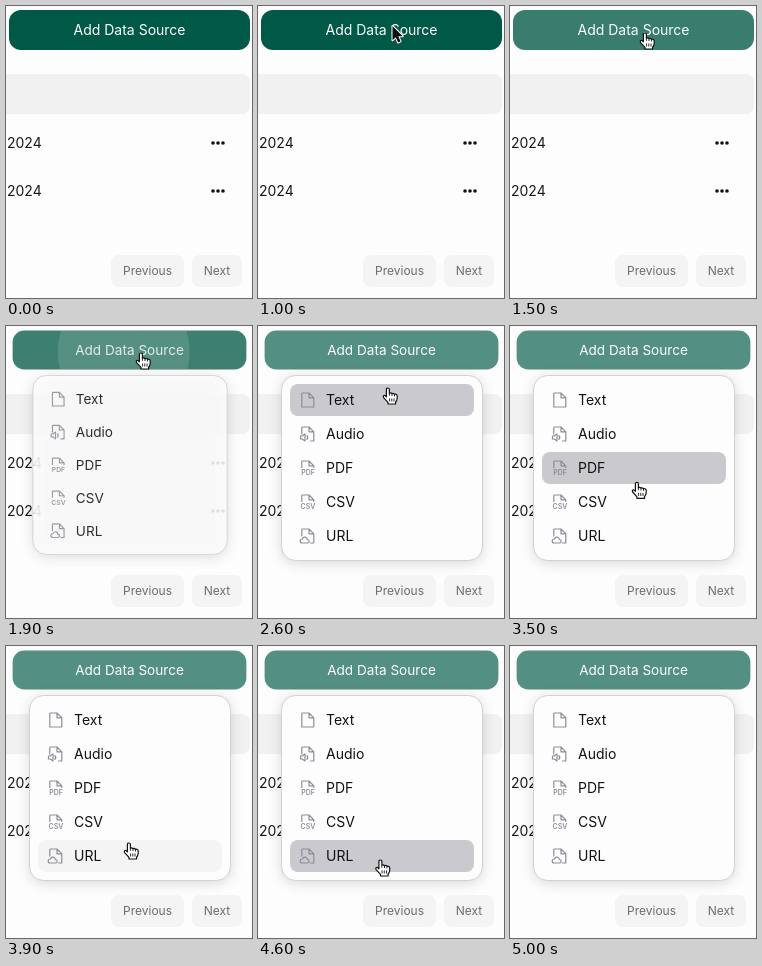
Write an HTML page with a canvas that moves like this. It is 246 by 292 pixels and loops after 5200 ms.

```html
<!DOCTYPE html>
<html lang="en">
<head>
<meta charset="utf-8">
<title>Add Data Source</title>
<style>
html, body { margin: 0; width: 100%; height: 100%; overflow: hidden; background: #fdfdfd; }
canvas { display: block; width: 246px; height: 292px; }
</style>
</head>
<body>
<canvas id="stage"></canvas>
<script>
const W = 246, H = 292, LOOP = 5200, STEP = 100;
const FONT = 'Inter, "Liberation Sans", sans-serif';
const canvas = document.getElementById('stage');
const ctx = canvas.getContext('2d');
const dpr = window.devicePixelRatio || 1;
canvas.width = W * dpr;
canvas.height = H * dpr;

const ITEMS = ['Text', 'Audio', 'PDF', 'CSV', 'URL'];
const ROW_TOP = 58, ROW_H = 32, PITCH = 34;

// Cursor tip: time, x, y
const PATH = [
  [700, 138, -6], [800, 137, 4], [900, 135.5, 13], [1000, 134.5, 20], [1200, 135, 27],
  [1900, 135, 27], [2200, 134, 42], [2400, 132, 59], [2600, 130, 62], [3200, 130, 126],
  [3900, 123, 197], [4100, 122, 206], [4500, 122, 206], [4700, 123, 222], [4900, 125, 262]
];

// Piecewise linear value of column c at time t
function track(keys, t, c = 1) {
  if (t <= keys[0][0]) return keys[0][c];
  for (let i = 1; i < keys.length; i++) {
    const a = keys[i - 1], b = keys[i];
    if (t <= b[0]) return a[c] + (b[c] - a[c]) * (t - a[0]) / (b[0] - a[0]);
  }
  return keys[keys.length - 1][c];
}

function tipAt(t) {
  return t < 700 || t >= 5000 ? null : { x: track(PATH, t, 1), y: track(PATH, t, 2) };
}

function box(x, y, w, h, r, fill) {
  ctx.beginPath();
  ctx.roundRect(x, y, w, h, r);
  ctx.fillStyle = fill;
  ctx.fill();
}

function text(str, x, y, size, color, weight = 400, align = 'left') {
  ctx.font = `${weight} ${size}px ${FONT}`;
  ctx.textAlign = align;
  ctx.fillStyle = color;
  ctx.fillText(str, x, y);
}

function scaled(s, x, y, draw) {
  ctx.save();
  ctx.translate(x, y);
  ctx.scale(s, s);
  ctx.translate(-x, -y);
  draw();
  ctx.restore();
}

function drawPage() {
  ctx.fillStyle = '#fdfdfd';
  ctx.fillRect(0, 0, W, H);
  box(-20, 68, 264, 40, 8, '#f1f1f1');
  for (const y of [137, 185]) {
    text('2024', 1, y + 5, 14, '#18181b');
    ctx.fillStyle = '#111';
    for (let i = 0; i < 3; i++) {
      ctx.beginPath();
      ctx.arc(207 + i * 5, y, 1.8, 0, 7);
      ctx.fill();
    }
  }
  box(105, 249, 73, 32, 8, '#f4f4f4');
  box(186, 249, 50, 32, 8, '#f4f4f4');
  text('Previous', 141.5, 269, 12, '#6c6c70', 400, 'center');
  text('Next', 211, 269, 12, '#6c6c70', 400, 'center');
}

function drawButton(t) {
  const fade = track([[1200, 0], [1500, 0.22], [1900, 0.24], [2200, 0.33]], t);
  const mix = c => Math.round(c + (253 - c) * fade);
  scaled(track([[1600, 1], [1800, 0.97]], t), 123.5, 24, () => {
    box(3, 4, 241, 40, 12, `rgb(${mix(0)},${mix(89)},${mix(70)})`);
    text('Add Data Source', 123.5, 29, 14, '#fff', 400, 'center');
    if (t < 1700 || t > 2200) return;
    ctx.save();
    ctx.beginPath();
    ctx.roundRect(3, 4, 241, 40, 12);
    ctx.clip();
    ctx.beginPath();
    ctx.arc(117.5, 26, track([[1700, 16], [1900, 68], [2200, 130]], t), 0, 7);
    ctx.fillStyle = `rgba(150,182,172,${track([[1700, 0.4], [1900, 0.28], [2200, 0]], t)})`;
    ctx.fill();
    ctx.restore();
  });
}

const stroke = d => ctx.stroke(new Path2D(d));

const SHEET = {
  Text: 'M1.5 1H8L12.8 5.8V15H.8V1.7Q.8 1 1.5 1Z M8 1V5.8H12.8',
  open: 'M.8 8V1.7Q.8 1 1.5 1H8L12.8 5.8V15H9.5 M8 1V5.8H12.8',
  label: 'M.8 7.5V1.7Q.8 1 1.5 1H8L12.8 5.8V7.5 M8 1V5.8H12.8'
};

function drawIcon(name, y) {
  ctx.save();
  ctx.translate(43, y - 8);
  ctx.strokeStyle = '#8d8d98';
  ctx.lineWidth = 1.2;
  ctx.lineJoin = ctx.lineCap = 'round';
  if (name === 'Text') {
    stroke(SHEET.Text);
  } else if (name === 'Audio') {
    stroke(SHEET.open);
    stroke('M-.5 10H1.2L4 8V15L1.2 13H-.5Z M6 9.7Q7.6 11.5 6 13.3');
  } else if (name === 'URL') {
    stroke(SHEET.open);
    stroke('M1 15Q-1 14.7 -.8 12.7Q-.5 11 1.3 11Q2.3 8.6 4.6 9.2Q6.3 9.8 6.3 11.5Q8.3 11.8 8.2 13.4Q8 15 6.5 15Z');
  } else {
    stroke(SHEET.label);
    text(name, 7, 15.2, 7, '#8d8d98', 600, 'center');
  }
  ctx.restore();
}

const rowAt = t => {
  const tip = tipAt(t);
  if (!tip || t < 2300) return -1;
  const row = Math.floor((tip.y - ROW_TOP) / PITCH);
  return row >= 0 && row < 5 && tip.y < ROW_TOP + row * PITCH + ROW_H ? row : -1;
};

// Highlight strength grows while the cursor stays on the row
function glow(row, t) {
  if (rowAt(t) !== row) return 0;
  if (rowAt(t - STEP) !== row) return 0.16;
  return rowAt(t - 2 * STEP) !== row ? 0.7 : 1;
}

function drawMenu(t) {
  if (t < 1900) return;
  ctx.save();
  ctx.globalAlpha = track([[1900, 0.88], [2100, 1]], t);
  scaled(track([[1900, 0.967], [2100, 1]], t), 124, 50, () => {
    ctx.save();
    ctx.shadowColor = 'rgba(0,0,0,.16)';
    ctx.shadowBlur = 14 * dpr;
    ctx.shadowOffsetY = 2 * dpr;
    box(24, 50, 200, 184.5, 14, '#fdfdfd');
    ctx.restore();
    ctx.strokeStyle = '#d3d3d5';
    ctx.lineWidth = 1;
    ctx.beginPath();
    ctx.roundRect(23.5, 49.5, 201, 185, 14);
    ctx.stroke();
    ITEMS.forEach((name, i) => {
      const y = ROW_TOP + i * PITCH;
      const a = glow(i, t);
      if (a) box(32, y, 184, ROW_H, 8, `rgba(201,201,206,${a})`);
      drawIcon(name, y + 16);
      text(name, 68, y + 21, 14, '#111113');
    });
  });
  ctx.restore();
}

const ARROW = new Path2D('M0 0V14.2L3.3 11.2L5.6 16.5L8.1 15.4L5.8 10.3H10.2Z');
const HAND = new Path2D('M-1.6 8V1.2Q-1.5 -.2 0 0Q1.3 0 1.4 1.4V5.2Q2.8 4.4 4 5.6Q5.5 4.9 6.5 6.3Q9 5.8 9.2 8V10.5Q9 12.4 7.6 14V16H0V14.4L-4.4 9.6Q-5.2 8.3 -4.2 7.5Q-3.2 7 -1.6 8.8Z');
const HAND_LINES = 'M1.4 5.2V7.8 M4 5.8V8 M6.5 6.5V8.4 M1.6 10.5V13.5 M3.8 10.5V13.5 M6 10.5V13.5';

function drawCursor(t) {
  const tip = tipAt(t);
  if (!tip) return;
  const hand = t >= 1200 && tip.y < 235;
  ctx.save();
  ctx.translate(tip.x, tip.y);
  ctx.lineJoin = 'round';
  if (hand) {
    ctx.fillStyle = '#fff';
    ctx.strokeStyle = '#111';
    ctx.lineWidth = 1.2;
    ctx.fill(HAND);
    ctx.stroke(HAND);
    ctx.lineWidth = 0.9;
    stroke(HAND_LINES);
  } else {
    ctx.strokeStyle = '#fff';
    ctx.lineWidth = 2;
    ctx.stroke(ARROW);
    ctx.fillStyle = '#111';
    ctx.fill(ARROW);
  }
  ctx.restore();
}

function draw(t) {
  ctx.setTransform(dpr, 0, 0, dpr, 0, 0);
  drawPage();
  drawButton(t);
  drawMenu(t);
  drawCursor(t);
}

const start = performance.now();
function tick() {
  const t = (performance.now() - start) % LOOP;
  draw(Math.floor(t / STEP) * STEP);
  requestAnimationFrame(tick);
}
tick();
</script>
</body>
</html>
```
